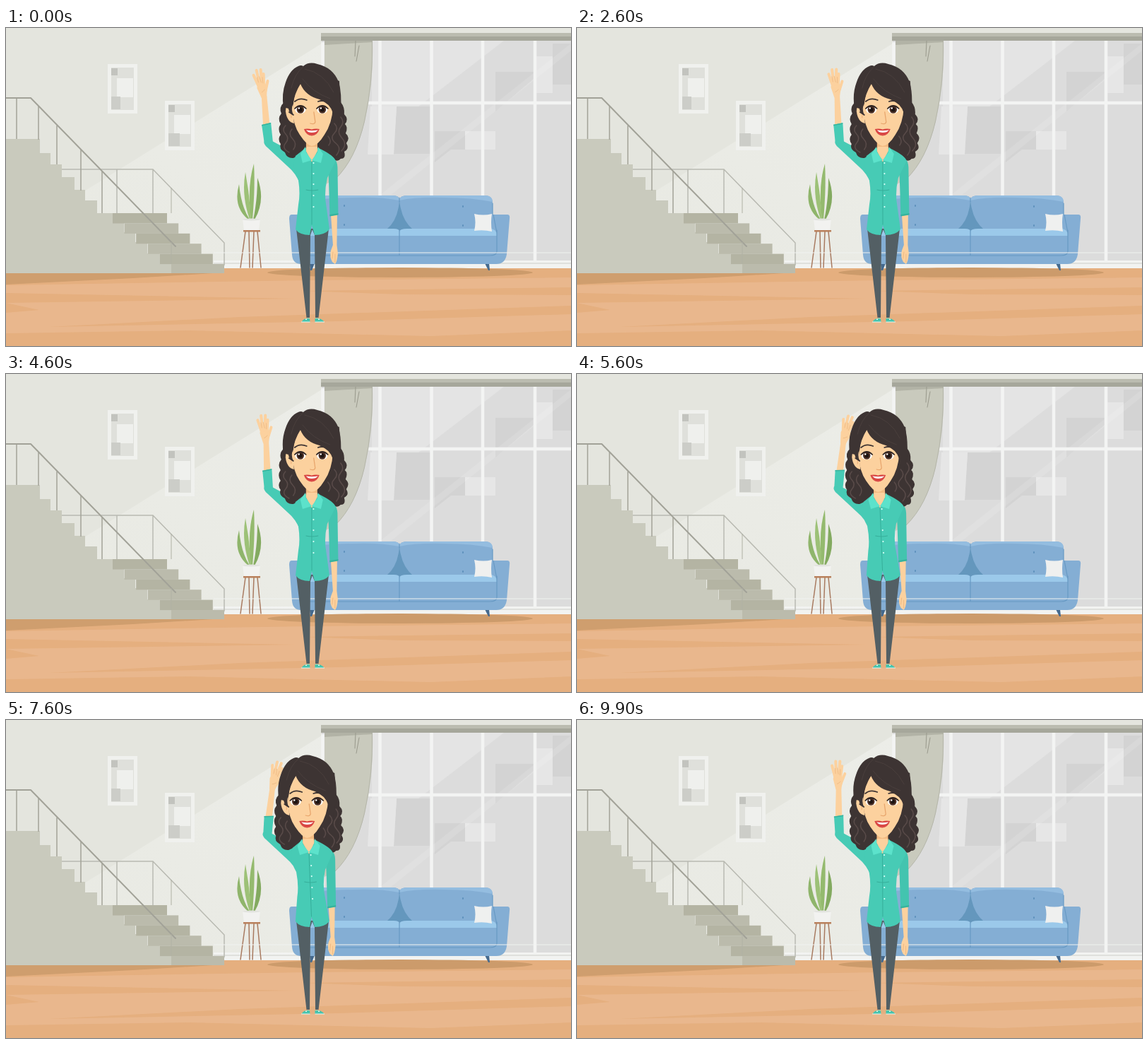
Recreate the animation shown at these times as an HTML page. Size 800x450 px, loop 10000 ms.

```html
<!DOCTYPE html>
<html lang="en">
<head>
<meta charset="utf-8">
<title>Waving hello</title>
<style>
html, body { margin: 0; width: 100%; height: 100%; overflow: hidden; background: #e4e5de; }
svg { display: block; width: 100vw; height: 100vh; }
.line { fill: none; stroke-linecap: round; stroke-linejoin: round; }
</style>
</head>
<body>
<svg viewBox="0 0 800 450">
  <defs>
    <linearGradient id="light" x1="1" y1="0" x2="0" y2="1">
      <stop offset="0" stop-color="#ecede8"/><stop offset="1" stop-color="#e8e9e2"/>
    </linearGradient>
    <clipPath id="glass"><path d="M451 18H800V332H451Z"/></clipPath>
  </defs>

  <!-- wall -->
  <path fill="#e4e5de" d="M0 0H800V345H0Z"/>
  <path fill="url(#light)" d="M447 22V345H0V300Z"/>
  <g id="pictures"></g>

  <!-- window -->
  <path fill="#dcdcdc" d="M447 18H800V335H447Z"/>
  <g clip-path="url(#glass)">
    <path fill="#e4e4e4" d="M518 18H705L518 162Z"/>
    <path fill="#d3d3d3" d="M693 62H747V72L693 118ZM774 22H800V80H774ZM553 111H601V178H549ZM607 146H650V172H630L607 190Z"/>
    <path fill="#e6e6e6" d="M516 111H553L549 179H512ZM650 146H693V172H650ZM750 40H774V92H750Z"/>
    <path fill="#fff" opacity=".12" d="M800 22V32L545 236H530Z"/>
  </g>
  <path fill="none" stroke="#f3f4f3" stroke-width="4.500" d="M448.500 20V335M529.500 18V332M602.500 18V332M675 18V332M749 18V332M512 106H800"/>
  <path fill="#c9cabd" d="M451 18H519Q521 75 508 132Q495 186 466 214L451 222Z"/>
  <path fill="none" stroke="#b5b6aa" stroke-width="1" d="M518.500 18Q520 75 507.500 132Q495 186 466 214"/>
  <path fill="#b2b3a6" d="M451 18H519V20L451 24Z"/>
  <path class="line" stroke="#99998c" d="M495 18L494 40M500 25L496 47"/>
  <path fill="#bbbcb0" d="M446 7H800V13H446Z"/>
  <path fill="#a6a79b" d="M446 12H800V18H446Z"/>

  <!-- floor -->
  <path fill="#f2f3f1" d="M294 329H800V341H294Z"/>
  <path fill="#dfe0dc" d="M294 332H800V334H294Z"/>
  <path fill="#e9b78d" d="M0 346H309V340H800V450H0Z"/>
  <path fill="#e5af7f" d="M309 340H800V353L430 357L0 364V347H309ZM0 375L410 383L0 389L47 399L0 403ZM800 367V378L560 377L420 372ZM800 393V405L470 415L60 423L330 409ZM0 432L260 428L600 436L800 428V450H0Z"/>
  <path fill="#cf9e6e" d="M0 346H309L180 354L0 363Z"/>

  <!-- stairs -->
  <path fill="none" stroke="#b9bab2" stroke-width="1.500" d="M79 200H208L309 304V336M157 200V262M208 200V262"/>
  <path fill="#c9cabd" d="M0 157H48V177H63V193H79V211H97V229H112V244H129V262H151V275H167V289H183V303H200V319H217V334H234V347H0Z"/>
  <g id="steps" fill="#b7b7a6"></g>
  <path class="line" stroke="#a2a298" stroke-width="2" d="M0 99H35L240 309"/>
  <path fill="none" stroke="#a2a298" stroke-width="1.500" d="M15 99V157M46 111V158M72 138V193M106 172V230M136 203V262"/>
  <path fill="none" stroke="#b0b1a4" stroke-width="1" d="M234 226V262M234 303V334"/>

  <!-- plant -->
  <path class="line" stroke="#a87a60" stroke-width="1.500" d="M339 288L332 339M344 288L345 339M351 288L349 339M356 288L361 339"/>
  <g id="leaves"></g>
  <path fill="#f2f2f0" d="M335 271H360L358 286H337Z"/>
  <ellipse cx="347.500" cy="271" rx="12.500" ry="1.500" fill="#e2e3df"/>
  <path fill="#b9805c" d="M336 286H360V288.500H336Z"/>

  <!-- sofa -->
  <ellipse cx="558" cy="346" rx="188" ry="7" fill="#cc9b6b"/>
  <path fill="#456a8e" d="M430 333H437L433 343H431ZM678 333H684L685 343H683Z"/>
  <path fill="#84aed4" d="M425 246Q427 236 440 237H548Q557 237 557 243Q558 237 568 237H678Q689 237 689 248V300H425Z"/>
  <path fill="#94bde0" d="M425 247Q427 236 440 237H548Q557 237 557 243Q558 237 568 237H678Q689 237 689 246Q660 240 620 240Q580 239 557 244Q530 239 495 240Q445 240 425 247Z"/>
  <path fill="#6497bd" d="M557 244Q555 272 539 285L557 295L576 285Q560 272 557 244Z"/>
  <path fill="#84aed4" d="M404 264H427V290H688V264H710Q714 264 713 270L709 320Q707 334 694 334H418Q406 334 405 321L401 270Q401 264 404 264Z"/>
  <path fill="#9bc9ea" d="M427 286Q429 284 440 284H549Q557 284 557 288Q558 284 568 284H685Q695 284 695 294H427Z"/>
  <path class="line" stroke="#6799c3" stroke-width="1.200" d="M695 286V316Q695 322 685 322H428M557 287V321M690 264L695 290M689 248V263M557 240V246"/>
  <path class="line" stroke="#5e91bc" stroke-width="2" d="M479 251V252M479 278V279M647 252V253M647 279V280"/>
  <path fill="#eff0ef" d="M663 263Q676 266 688 263Q686 275 688 288Q676 285 663 287Q666 275 663 263Z"/>
  <path fill="#f2f3f1" d="M294 317.500H800V318.500H294Z"/>

  <!-- legs -->
  <path fill="#535f64" d="M411 284H434L431 293L430 410H425.500ZM433 284H457L442.500 410H438L437 293Z"/>
  <path fill="#fcd19e" d="M426 410H430V412H426ZM438 410H442V412H438Z"/>
  <path fill="#45c4ae" d="M419 415Q423 410 430 411L430.500 416H419ZM437.500 411Q445 410 450 415V416H437.500Z"/>
  <path fill="#e9f5f0" d="M418 415.500H430.500V416.500H418ZM437.500 415.500H451V416.500H437.500ZM424 411.500H426V413H424ZM442 411.500H444V413H442Z"/>

  <!-- raised arm -->
  <g id="upperArm">
    <g id="forearm">
      <path fill="#fcd19e" d="M364 138L361.500 96H369L373.500 138Z"/>
      <g id="hand">
        <path fill="#fcd19e" d="M361.500 99L355 85Q355 77 362 77Q368 78 369 87L369 99Z"/>
        <path class="line" stroke="#fcd19e" stroke-width="4" d="M358 84L350 67M359 81L354 60M362 81L360 59M365 82L364 65M367 90L370 75"/>
        <path class="line" stroke="#eeb983" stroke-width=".8" d="M357 77L355 70M361 77L358 69M363.500 78L362.500 70M366 87Q364 90 362 91"/>
      </g>
      <path fill="#47cbb5" d="M362 137L375 134L378 162Q372 170 366 164Z"/>
      <path fill="#36b39e" d="M362 137L375 134V135.500L362 138.500Z"/>
    </g>
    <path fill="#47cbb5" d="M377 160L418 182L416 220Q411 206 398 195L370 169Q364 164 366 159Z"/>
  </g>

  <!-- resting arm -->
  <g id="restArm">
    <path fill="#fcd19e" d="M460 264H469L468.500 307L470 319Q469 331 466 334L462 331Q458 324 460 315L463 307Z"/>
    <path class="line" stroke="#eeb983" d="M463 317L462 326M466 320V331"/>
    <path fill="#43c4af" d="M455 182Q469 182 469.500 197L470.500 264L458.500 266L457 215Z"/>
    <path fill="#36b39e" d="M458.500 264L470.500 262V264.500L458.500 266.500Z"/>
  </g>

  <g id="hairBack">
    <path fill="#3d3433" d="M430 60L398 75Q392 92 394 105Q386 112 390 121Q384 128 389 136Q384 143 389 151Q384 157 389 164Q386 171 395 176Q398 185 407 184L424 176H442L462 184Q469 191 474 185Q482 185 479 175Q487 171 482 163Q488 155 481 149Q485 140 480 136Q486 129 479 122Q480 112 474 105L472 75Z"/>
    <path class="line" stroke="#594b49" stroke-width="1.500" d="M396 138Q390 144 396 150T396 163T401 176M405 143Q399 150 406 157T407 172M465 135Q472 142 465 149T467 163T468 180M474 126Q480 133 474 140T476 156T475 174M456 153Q462 160 457 166"/>
  </g>

  <g id="torso">
    <path fill="#47cbb5" d="M424 170L410 181Q404 196 414 215Q417 235 414 250L410 285Q416 293 430 293L433 279L437 293Q451 293 458 285L453.500 252Q450 234 455 212L467 188Q464 180 443 170Z"/>
    <path fill="#f3bb82" d="M425 156H441V172L433 190L425 174Z"/>
    <path fill="#fcd19e" d="M425 168H441V174L433 189L425 174Z"/>
    <path fill="#5ce2cb" d="M424 168L417 178L420 191L433 187L425 176ZM442 168L449 178L446 191L433 187L441 176Z"/>
    <path class="line" stroke="#36ae9a" d="M433 189V278M425 229Q433 231 442 229"/>
    <path class="line" stroke="#d9fff7" stroke-width="2.200" d="M435.500 191V191.100M435.500 206V206.100M435.500 221V221.100M435.500 237V237.100M435.500 253V253.100"/>
  </g>

  <g id="head">
    <path fill="#fcd19e" d="M406 109Q396 106 396 118Q398 133 408 135Z"/>
    <path class="line" stroke="#e9ad76" d="M400 114Q405 117 404 127"/>
    <path fill="#fcd19e" d="M418 78Q406 92 406 118Q407 138 416 151Q426 166 433 167Q442 166 451 151Q462 135 463 112L458 86Z"/>
    <path fill="#3d3433" d="M417 79Q408 94 407 107Q403 114 407 123Q401 121 400 114L393 112Q390 93 396 77Q402 59 414 54Q418 52 421 54Q429 47 441 51Q463 56 471 76Q476 92 474 118Q470 128 470 138Q463 134 463 120Q459 107 444 101Q424 96 417 79Z"/>
    <path class="line" stroke="#4a3f3d" d="M421 55Q409 64 404 85M423 58Q450 63 464 91M420 72Q434 91 459 100"/>
    <path class="line" stroke="#3d3433" stroke-width="1.800" d="M401 119L407 123M409 104Q416 98 426 102M442 104Q450 101 458 107"/>
    <g id="eyes"></g>
    <path class="line" stroke="#e8a66d" stroke-width="1.300" d="M436 119L438 133Q437 137 431 135"/>
    <path fill="#d94845" d="M422 143Q428 142 433 143.500Q438 142 444 143Q441 152 433 152.500Q425 152 422 143Z"/>
    <path fill="#fff" d="M425 144.500Q433 146 442 144.500Q439 148 433 148Q428 148 425 144.500Z"/>
  </g>
</svg>
<script>
const get = id => document.getElementById(id);
const repeat = (id, items, draw) => { get(id).innerHTML = items.map(draw).join(''); };
const rect = (x, y, w, h, fill) => `<rect x="${x}" y="${y}" width="${w}" height="${h}" fill="${fill}"/>`;

repeat('pictures', [[144, 51], [225, 103]], ([x, y], i) =>
  rect(x, y, 42, 70, '#f0f1ee') + rect(x + 5, y + 5, 32, 60, '#dfe0db') +
  rect(x + 5, y + 6, 9, 10, '#c2c3be') + rect(x + 13, y + 20, 23, 27, '#eff0ed') +
  rect(x + 5, y + 46, i ? 16 : 13, 18, '#cccdc8'));

repeat('steps', [0, 1, 2, 3, 4, 5], i =>
  rect(151 + 16.6 * i, 262 + 14.4 * i, 77 - i * .4, i === 5 ? 13 : 14.5, i % 2 ? '#bbbbac' : '#b4b4a3'));

// Each leaf: base x, bulge x, tip x, tip y, colour.
repeat('leaves', [
  [343, 326, 330, 221, '#8fb56b'], [345, 338, 339, 204, '#9dc177'],
  [350, 361, 356, 212, '#83aa60'], [347, 346, 351, 192, '#94ba6e']
], ([base, bulge, tip, top, fill]) =>
  `<path fill="${fill}" d="M${base} 271Q${bulge - 5} ${top + 32} ${tip} ${top}Q${bulge + 7} ${top + 32} ${base + 2} 271Z"/>`);

repeat('eyes', [417, 448], x =>
  `<ellipse cx="${x}" cy="115.500" rx="7.500" ry="5.500" fill="#fff"/>
   <circle cx="${x}" cy="115.500" r="5.200" fill="#4c2f24"/><circle cx="${x}" cy="115.500" r="3" fill="#1d1413"/>
   <circle cx="${x - 2}" cy="113.500" r="1.200" fill="#fff"/>
   <path class="line" stroke="#2d2321" stroke-width="1.700" d="M${x - 8} 114Q${x} 106 ${x + 8} 114"/>`);

const LOOP = 10000, WAVE = 2000 / 3, STEP = 100, HIP = 290;
const move = (id, value) => get(id).setAttribute('transform', value);

function pose(t) {
  const angle = t / WAVE * Math.PI * 2;
  const lean = (Math.cos(angle + .26) - 1) * 3.6 / 175;
  const swing = 1 - Math.cos(angle - .26);
  // The torso shears from the hips and carries the head; the hand trails.
  move('torso', `matrix(1 0 ${-lean} 1 ${lean * HIP} 0)`);
  move('hairBack', `translate(${lean * 170} 0)`);
  move('head', `translate(${lean * 170} 0)`);
  move('restArm', `translate(${lean * 85} 0)`);
  move('upperArm', `translate(${lean * 50} 0)`);
  move('forearm', `rotate(${swing * 7.2} 370 164)`);
  move('hand', `rotate(${swing * 9.4} 365 98)`);
}

const start = performance.now();
function tick() {
  const t = (performance.now() - start) % LOOP;
  pose(Math.floor(t / STEP) * STEP);
  requestAnimationFrame(tick);
}
tick();
</script>
</body>
</html>
```
